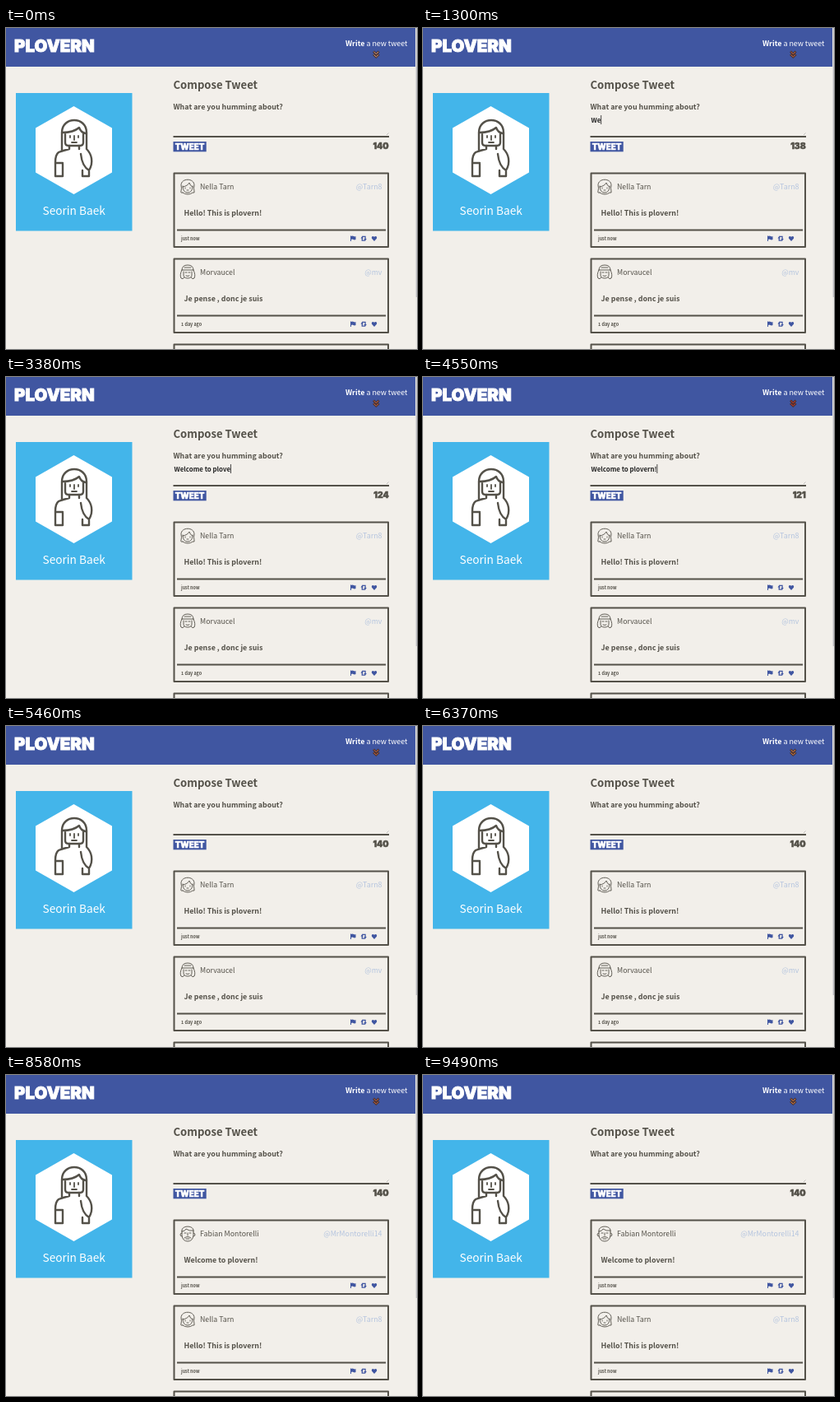
An HTML page that plays this animation: 500x390 px, repeating every 9.62 s.

```html
<!DOCTYPE html>
<html lang="en">
<head>
<meta charset="utf-8">
<title>Plovern</title>
<style>
html, body { margin: 0; width: 100%; height: 100%; overflow: hidden; background: #f2efea; }
svg { display: block; width: 500px; height: 390px; }
text { font-family: "Noto Sans CJK JP", "Noto Sans CJK SC", "Noto Sans", sans-serif; fill: #545149; white-space: pre; }
.semi { font-weight: 600; }
.light { font-weight: 300; }
.chunky { font-family: Inter, "DejaVu Sans", sans-serif; font-weight: 900; stroke-width: .5; }
.white { fill: #fff; stroke: #fff; }
.line { fill: none; stroke: #545149; stroke-linecap: round; stroke-linejoin: round; }
.blue { fill: #4056a1; }
.end { text-anchor: end; }
</style>
</head>
<body>
<svg viewBox="0 0 500 390">
  <rect width="500" height="390" fill="#f2efea"/>
  <rect class="blue" width="498" height="47"/>
  <text class="chunky white" x="10" y="29.3" font-size="20.5" style="stroke-width:.9">PLOVERN</text>
  <text x="413" y="21.5" font-size="8.9" style="fill:#fff"><tspan class="semi">Write</tspan><tspan class="light"> a new tweet</tspan></text>
  <g fill="none">
    <path d="M447 28.5l3.3 3 3.3-3M447 32l3.3 3 3.3-3" stroke="#4a302d" stroke-width="2.8"/>
    <path id="arrow" d="M447.5 29l2.8 2.5 2.8-2.5M447.5 32.5l2.8 2.5 2.8-2.5" stroke-width="1"/>
  </g>

  <rect x="12" y="79" width="141.5" height="167.5" fill="#43b5ea"/>
  <path d="M82.5 95L129 121.500V175.500L82.500 202L36 175.500V121.500Z" fill="#fff"/>
  <g class="line" stroke-width="2.4">
    <path d="M68 149V127C68 107 98 107 98 127V147C104 153 107 163 101 173C96 170 92 163 91 153"/>
    <path d="M72 127V139Q72 143 76 143H90Q94 143 94 139V129M69 127Q82 127 89 121Q91 127 97 128"/>
    <path d="M77 143V147Q69 149 64 151Q60 154 60 163V180M69 165V180M60 164H69M89 143V147M93 173V180H101V174M60 180H69"/>
    <path d="M78 131V133M88 131V133M83 131V136M80 139H86" stroke-width="1.8"/>
  </g>
  <text x="82.7" y="227" font-size="13.7" text-anchor="middle" style="fill:#fff">Seorin Baek</text>

  <text class="semi" x="203.500" y="73.500" font-size="13.1">Compose Tweet</text>
  <text class="semi" x="203.500" y="98.500" font-size="8.9">What are you humming about?</text>
  <text id="typed" class="semi" x="204.500" y="114.500" font-size="7.9" style="fill:#222"></text>
  <rect id="caret" y="106" width=".8" height="11" fill="#222"/>
  <path d="M463 130l2.500-2.500" stroke="#aaa" stroke-width=".7"/>
  <rect x="203.500" y="131" width="262.500" height="2" fill="#545149"/>
  <rect class="blue" x="203.500" y="138" width="40.200" height="12.300"/>
  <text class="chunky white" x="205.700" y="147.700" font-size="9.700">TWEET</text>
  <text id="count" class="chunky end" x="465.700" y="147.300" font-size="10.300" stroke="#545149"></text>

  <g id="before"></g>
  <g id="after"></g>
  <rect x="498" width="2" height="390" fill="#eceae7"/>
  <rect id="thumb" x="498.700" width="1.300" fill="#bfc0c4"/>
</svg>
<script>
const $ = id => document.getElementById(id);
const LOOP = 9620, STEP = 130;
const MESSAGE = 'Welcome to plovern!';
const TYPE_START = 1050, KEY_TIME = 148, FOCUS = 780, CLEAR = 5460, POST = 6500;
const ARROW = ['#d9a38a', '#e08a4a', '#c86a4a', '#d23a2e'];

// Line-drawn faces, centred on 0,0
const FACE = {
  girl: 'M-6 -1Q-6 7 0 7Q6 7 6 -1M-6 0Q0 -1 2 -5Q3 -1 6 0M-6 7Q-9 8 -8 5Q-7 2 -8 -2C-8 -11 8 -11 8 -2Q7 2 8 5Q9 8 6 7Q4 9 0 9Q-4 9 -6 7M-3 1V2M3 1V2M-1 4H1',
  wig: 'M-5 -1V3Q-5 7 0 7Q5 7 5 3V-1M-7 -3H7M-7 -3Q-7 -9 0 -9Q7 -9 7 -3M-7 -3Q-10 3 -8 7Q-6 9 -4 6M7 -3Q10 3 8 7Q6 9 4 6M-3 0H-1M1 0H3M-2 4Q0 5 2 4M-4 -6H4',
  beard: 'M-7 -3V2Q-6 9 0 9Q6 9 7 2V-3M-7 -3C-9 -11 9 -11 7 -3M-7 -3Q-3 -3 -2 -6Q2 -3 7 -4M-7 -1Q-9 -1 -9 1Q-9 3 -7 3M7 -1Q9 -1 9 1Q9 3 7 3M-4 -1H-2M2 -1H4M0 -1V2M-4 5Q0 2 4 5M-2 6H2'
};

const tweets = [
  ['Fabian Montorelli', '@MrMontorelli14', 'beard', MESSAGE, 'just now'],
  ['Nella Tarn', '@Tarn8', 'girl', 'Hello! This is plovern!', 'just now'],
  ['Morvaucel', '@mv', 'wig', 'Je pense , donc je suis', '1 day ago']
];

const frame = '<rect class="line" x="204.500" y="1" width="260.500" height="89.500" stroke-width="2"/>';

function card([name, handle, face, words, age], i) {
  return `<g transform="translate(0 ${175.5 + 104 * i})">${frame}
    <path class="line" transform="translate(221 17.5)" d="${FACE[face]}" stroke-width=".9"/>
    <text class="light" x="236" y="20.700" font-size="8.800">${name}</text>
    <text class="light end" x="457.500" y="20.700" font-size="8.900" style="fill:#b5c5df">${handle}</text>
    <text class="semi" x="216.500" y="52" font-size="8.900">${words}</text>
    <rect x="208" y="69" width="254" height="2" fill="#545149"/>
    <text class="semi" x="213" y="82.200" font-size="5.400">${age}</text>
    <g class="blue">
      <path d="M419 77h1v.5q1.500-.8 3 0t2.500 0v4q-1.500.8-3 0t-2.500 0v2h-1z"/>
      <path d="M431.500 80l1.700-2.500 1.700 2.500h-1v2h2.500l1 1.200h-4.800V80zM438.800 80.500l-1.700 2.500-1.700-2.500h1v-2h-2.500l-1-1.200h4.800v3.200z"/>
      <path d="M448 83.500l-3-3.200q-.7-2.800 1.500-2.800 1 0 1.500 1 .5-1 1.500-1 2.200 0 1.500 2.800z"/>
    </g></g>`;
}

const list = items => items.map(card).join('') + `<g transform="translate(0 383.5)">${frame}</g>`;
$('before').innerHTML = list(tweets.slice(1));
$('after').innerHTML = list(tweets.slice(0, 2));

const show = (id, on) => $(id).setAttribute('visibility', on ? 'visible' : 'hidden');

function draw(now) {
  const t = Math.floor(now % LOOP / STEP) * STEP;
  const keys = t < CLEAR ? Math.max(0, Math.min(MESSAGE.length, Math.floor((t - TYPE_START) / KEY_TIME) + 1)) : 0;
  $('typed').textContent = MESSAGE.slice(0, keys);
  $('count').textContent = 140 - keys;

  const blink = t < 3450 || Math.floor((t - 3450) / 520) % 2 === 0;
  show('caret', t >= FOCUS && t < CLEAR && blink);
  $('caret').setAttribute('x', 204.5 + (keys ? $('typed').getComputedTextLength() : 0));

  const posted = t >= POST;
  show('before', !posted);
  show('after', posted);
  $('thumb').setAttribute('height', posted ? 271 : 327);
  $('arrow').setAttribute('stroke', ARROW[t / STEP % 4]);
}

const start = performance.now();
function tick() {
  draw(performance.now() - start);
  requestAnimationFrame(tick);
}
tick();
</script>
</body>
</html>
```
